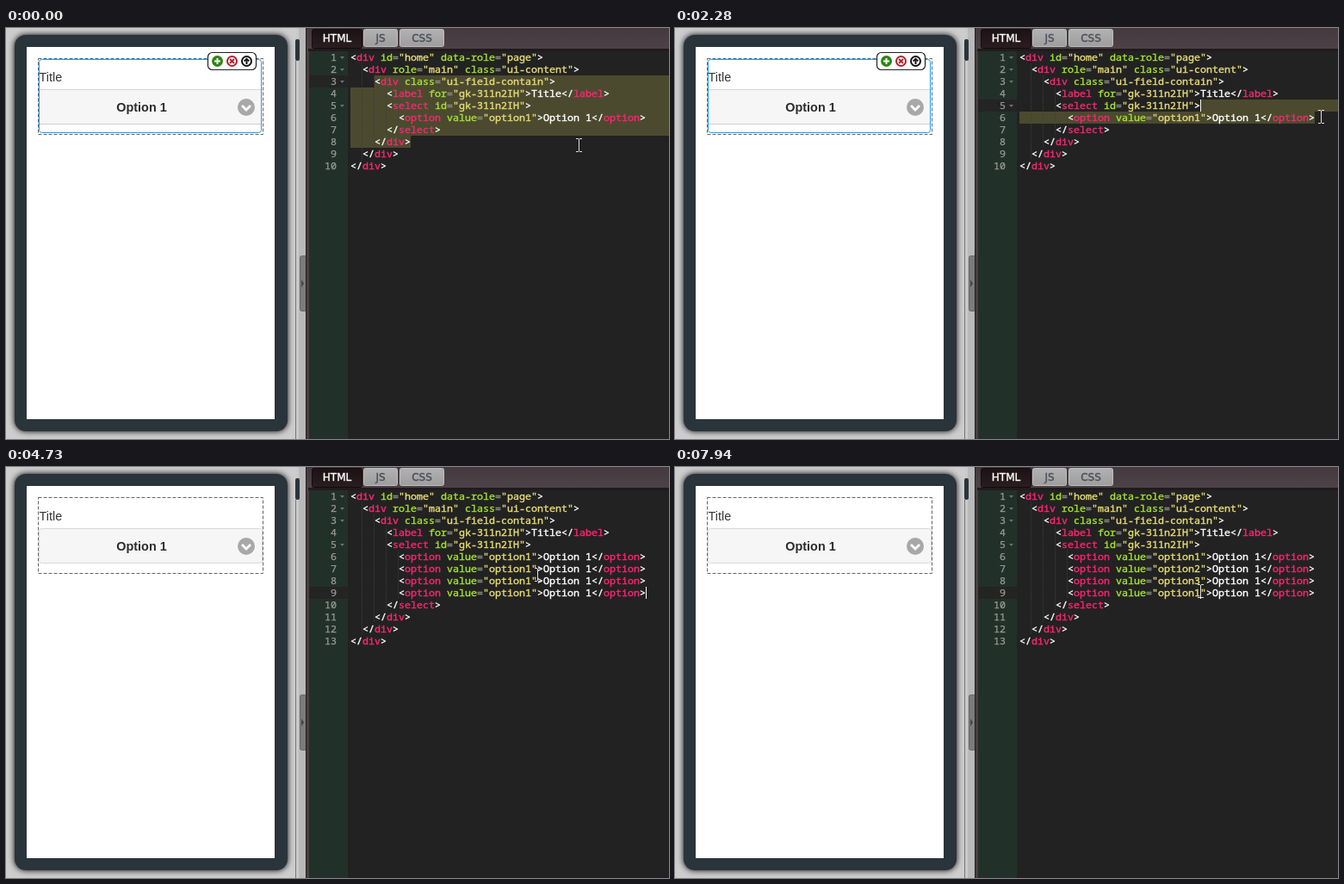
An HTML page with a canvas that plays this animation: 770x477 px, repeating every 8000 ms.

```html
<!DOCTYPE html>
<html lang="en">
<head>
<meta charset="utf-8">
<title>Select editing in a code editor</title>
<style>
  html, body { margin: 0; width: 100%; height: 100%; overflow: hidden; background: #222; }
  canvas { display: block; }
</style>
</head>
<body>
<canvas id="stage" width="770" height="477"></canvas>
<script>
const ctx = document.getElementById('stage').getContext('2d');
const LOOP = 8000, BLINK = 520;
const LEFT = 400, TOP = 27, CHAR = 7, ROW = 14, RIGHT = 770;
const MONO = '11.667px "Noto Sans Mono", "DejaVu Sans Mono", monospace';
const COLORS = { tag: '#f92672', attr: '#a6e22e', string: '#e6db74', equals: '#8a8a80', plain: '#fff' };

// Editor states; selection is [startRow, startCol, endRow, endCol].
const states = [
  { at: 0, row: 3, values: '1', selection: [3, 4, 8, 10] },
  { at: 1020, row: 6, col: 49, values: '1' },
  { at: 1200, row: 5, col: 30, values: '1', selection: [5, 30, 6, 49] },
  { at: 2540, row: 6, col: 49, values: '1' },
  { at: 3000, row: 7, col: 49, values: '11' },
  { at: 3590, row: 8, col: 49, values: '111' },
  { at: 4370, row: 9, col: 49, values: '1111' },
  { at: 5110, row: 7, col: 30, values: '1111' },
  { at: 5430, row: 7, col: 29, values: '1111', selection: [7, 29, 7, 30] },
  { at: 6060, row: 7, col: 30, values: '1211' },
  { at: 6790, row: 8, col: 30, values: '1211' },
  { at: 6910, row: 8, col: 29, values: '1211', selection: [8, 29, 8, 30] },
  { at: 7430, row: 8, col: 30, values: '1231' },
  { at: 7750, row: 9, col: 30, values: '1231' }
];

// Mouse waypoints: time, x, y.
const mousePath = [
  [0, 665, 136], [200, 665, 136], [620, 745.5, 105], [1000, 745.5, 105],
  [1140, 746, 99.5], [1200, 746, 91], [1690, 746, 91], [2210, 750, 103],
  [3590, 750, 103], [4070, 649, 133], [4310, 630, 130], [4370, 630, 130],
  [4910, 611, 123], [5110, 611, 123], [5430, 605, 125], [5830, 605, 125],
  [6200, 609.5, 134], [6500, 609.5, 134], [6590, 612, 134], [6760, 612, 134],
  [6910, 609.5, 134], [7340, 609.5, 134], [7550, 609.5, 143], [7720, 609.5, 143],
  [7940, 609.5, 144], [LOOP, 609.5, 144]
];

function mouseAt(time) {
  const i = mousePath.findIndex(point => point[0] > time);
  const [t0, x0, y0] = mousePath[i - 1], [t1, x1, y1] = mousePath[i];
  const k = (time - t0) / (t1 - t0);
  return [Math.round(x0 + (x1 - x0) * k), Math.round(y0 + (y1 - y0) * k)];
}

function codeLines(values) {
  return [
    '<div id="home" data-role="page">',
    '  <div role="main" class="ui-content">',
    '    <div class="ui-field-contain">',
    '      <label for="gk-311n2IH">Title</label>',
    '      <select id="gk-311n2IH">',
    ...[...values].map(v => `        <option value="option${v}">Option 1</option>`),
    '      </select>',
    '    </div>',
    '  </div>',
    '</div>'
  ];
}

function rect(x, y, w, h, color) {
  ctx.fillStyle = color;
  ctx.fillRect(x, y, w, h);
}

function roundRect(x, y, w, h, radius, fill, stroke, width = 1) {
  ctx.beginPath();
  ctx.roundRect(x, y, w, h, radius);
  if (fill) { ctx.fillStyle = fill; ctx.fill(); }
  if (stroke) { ctx.strokeStyle = stroke; ctx.lineWidth = width; ctx.stroke(); }
}

function line(points, color, width = 1) {
  ctx.strokeStyle = color;
  ctx.lineWidth = width;
  ctx.beginPath();
  points.forEach(([x, y]) => ctx.lineTo(x, y));
  ctx.stroke();
}

function circle(x, y, radius, fill, stroke, width) {
  roundRect(x - radius, y - radius, radius * 2, radius * 2, radius, fill, stroke, width);
}

// A thin outline (weight) thickens small light-on-dark text.
function text(string, x, y, font, color, align = 'left', weight = 0) {
  ctx.font = font;
  ctx.fillStyle = ctx.strokeStyle = color;
  ctx.textAlign = align;
  ctx.fillText(string, x, y);
  if (weight) {
    ctx.lineWidth = weight;
    ctx.strokeText(string, x, y);
  }
}

function vertical(y0, y1, ...colors) {
  const gradient = ctx.createLinearGradient(0, y0, 0, y1);
  colors.forEach((c, i) => gradient.addColorStop(i / (colors.length - 1), c));
  return gradient;
}

function drawToolbar() {
  roundRect(234.5, 28.5, 56, 20, 5, '#fff', '#222', 1.2);
  circle(245.5, 38.5, 6.5, '#2c8512');
  line([[242, 38.5], [249, 38.5]], '#fff', 2);
  line([[245.5, 35], [245.5, 42]], '#fff', 2);
  circle(262.5, 38.5, 5.5, '#fff', '#b3202c', 2);
  line([[260, 36], [265, 41]], '#b3202c', 2);
  line([[265, 36], [260, 41]], '#b3202c', 2);
  circle(279.5, 38.5, 5.5, '#fff', '#111', 2);
  line([[279.5, 42], [279.5, 36]], '#111', 2);
  line([[276.7, 38.5], [279.5, 35.7], [282.3, 38.5]], '#111', 1.8);
}

function drawDevice(selected) {
  rect(0, 0, 337, 477, '#cdcdcd');
  ctx.save();
  ctx.shadowColor = '#000';
  ctx.shadowBlur = 7;
  roundRect(10, 8, 317, 460, 13, '#2a343b');
  ctx.restore();
  rect(24, 22, 288, 432, '#fff');

  if (selected) {
    rect(39, 72, 257, 40, '#f6f6f6');
    rect(39, 71, 257, 1, '#d6d6d6');
    rect(39, 111, 257, 1, '#d0d0d0');
  } else {
    roundRect(38.5, 71.5, 259, 40, 3, '#f6f6f6', '#d8d8d8');
  }
  ctx.setLineDash([4, 2]);
  ctx.strokeStyle = '#666';
  ctx.lineWidth = 1;
  ctx.strokeRect(37.5, 35.5, 261, 88);
  ctx.setLineDash([]);
  if (selected) roundRect(38.5, 36.5, 258, 85, 3, null, '#1c9be6');

  text('Title', 38.5, 62, '14.4px "Liberation Sans", Arial, sans-serif', '#333');
  text('Option 1', 157.5, 97, 'bold 14.4px "Liberation Sans", Arial, sans-serif', '#2d2d2d', 'center');
  circle(279, 92, 10, '#a8a8a8');
  line([[274, 90], [279, 95], [284, 90]], '#fff', 2.8);
  if (selected) drawToolbar();
}

function drawTab(label, x, width, active) {
  const fill = active ? vertical(1, 24, '#1b1214', '#2b1d20') : vertical(1, 22, '#b2b2b2', '#9d9d9d');
  roundRect(x + .5, 1.5, width - 1, active ? 22 : 20, 2, fill, active ? '#120c0d' : '#bdbdbd');
  text(label, x + width / 2, 16, '12px "DejaVu Sans", Verdana, sans-serif',
    active ? '#fff' : '#4a4e5c', 'center', .35);
}

function drawChrome() {
  rect(337, 0, 12, 477, '#b9b9b9');
  rect(336, 38, 1, 439, '#777');
  rect(337, 0, 3, 477, '#cacaca');
  roundRect(336, 13, 5, 25, 2, '#2a343b');
  roundRect(341.5, 264.5, 8, 64, 2, '#7b7b7b', '#686868');
  ctx.fillStyle = '#444';
  ctx.beginPath();
  ctx.moveTo(343, 292); ctx.lineTo(346, 296.5); ctx.lineTo(343, 301);
  ctx.fill();
  rect(348, 0, 422, 477, '#493f42');
  rect(348, 0, 1, 477, '#241e20');
  rect(349, 0, 421, 24, vertical(0, 24, '#443a3e', '#4d4247'));
  rect(351, 24, 419, 3, '#211b1d');
  drawTab('HTML', 355, 59, true);
  drawTab('JS', 415, 40, false);
  drawTab('CSS', 457, 52, false);
}

function drawSelection([r0, c0, r1, c1]) {
  for (let r = r0; r <= r1; r++) {
    const x0 = r === r0 ? LEFT + c0 * CHAR : LEFT;
    const x1 = r === r1 ? LEFT + c1 * CHAR : RIGHT;
    rect(x0, TOP + (r - 1) * ROW, x1 - x0, ROW, '#4b4a2f');
  }
}

function drawCodeLine(source, baseline) {
  let inTag = false, expectName = false;
  for (const { 0: token, index } of source.matchAll(/<\/?|>|"[^"]*"|=|[\w-]+/g)) {
    let color = COLORS.plain;
    if (token[0] === '<') inTag = expectName = true;
    else if (token === '>') inTag = false;
    else if (inTag) {
      color = token[0] === '"' ? COLORS.string : token === '=' ? COLORS.equals
        : expectName ? COLORS.tag : COLORS.attr;
      expectName = false;
    }
    text(token, LEFT + index * CHAR, baseline, MONO, color, 'left', .4);
  }
}

function drawEditor(state, time) {
  rect(352, TOP, 45, 450, '#22302a');
  rect(397, TOP, 373, 450, '#222');
  rect(352, TOP + (state.row - 1) * ROW, 45, ROW, '#242424');
  if (state.selection) drawSelection(state.selection);

  codeLines(state.values).forEach((source, i) => {
    const y = TOP + i * ROW, indent = source.search(/\S/);
    for (let col = 2; col <= indent; col += 2)
      for (let dot = 0; dot < ROW; dot += 2) rect(LEFT + col * CHAR - 1, y + dot, 1, 1, '#3d3d3a');
    text(i + 1, 384, y + 11, MONO, '#999d94', 'right', .25);
    if ([0, 1, 2, 4].includes(i)) {
      ctx.fillStyle = '#69736d';
      ctx.beginPath();
      ctx.moveTo(388, y + 6); ctx.lineTo(393, y + 6); ctx.lineTo(390.5, y + 9);
      ctx.fill();
    }
    drawCodeLine(source, y + 11);
  });

  const caretOn = Math.floor((time - state.at) / BLINK) % 2 === 0;
  if (state.col && caretOn)
    rect(LEFT + state.col * CHAR, TOP + (state.row - 1) * ROW, 1, ROW, '#f8f8f0');
}

function drawMouse([x, y]) {
  const color = '#dedede';
  rect(x, y - 7, 1, 14, color);
  for (const edge of [y - 8, y + 7]) {
    rect(x - 3, edge, 3, 1, color);
    rect(x + 1, edge, 3, 1, color);
  }
}

function frame(now) {
  const time = now % LOOP;
  const state = states.filter(s => s.at <= time).pop();
  drawDevice(time < 3130);
  drawChrome();
  drawEditor(state, time);
  drawMouse(mouseAt(time));
  requestAnimationFrame(() => frame(performance.now() - start));
}

const start = performance.now();
frame(0);
</script>
</body>
</html>
```
